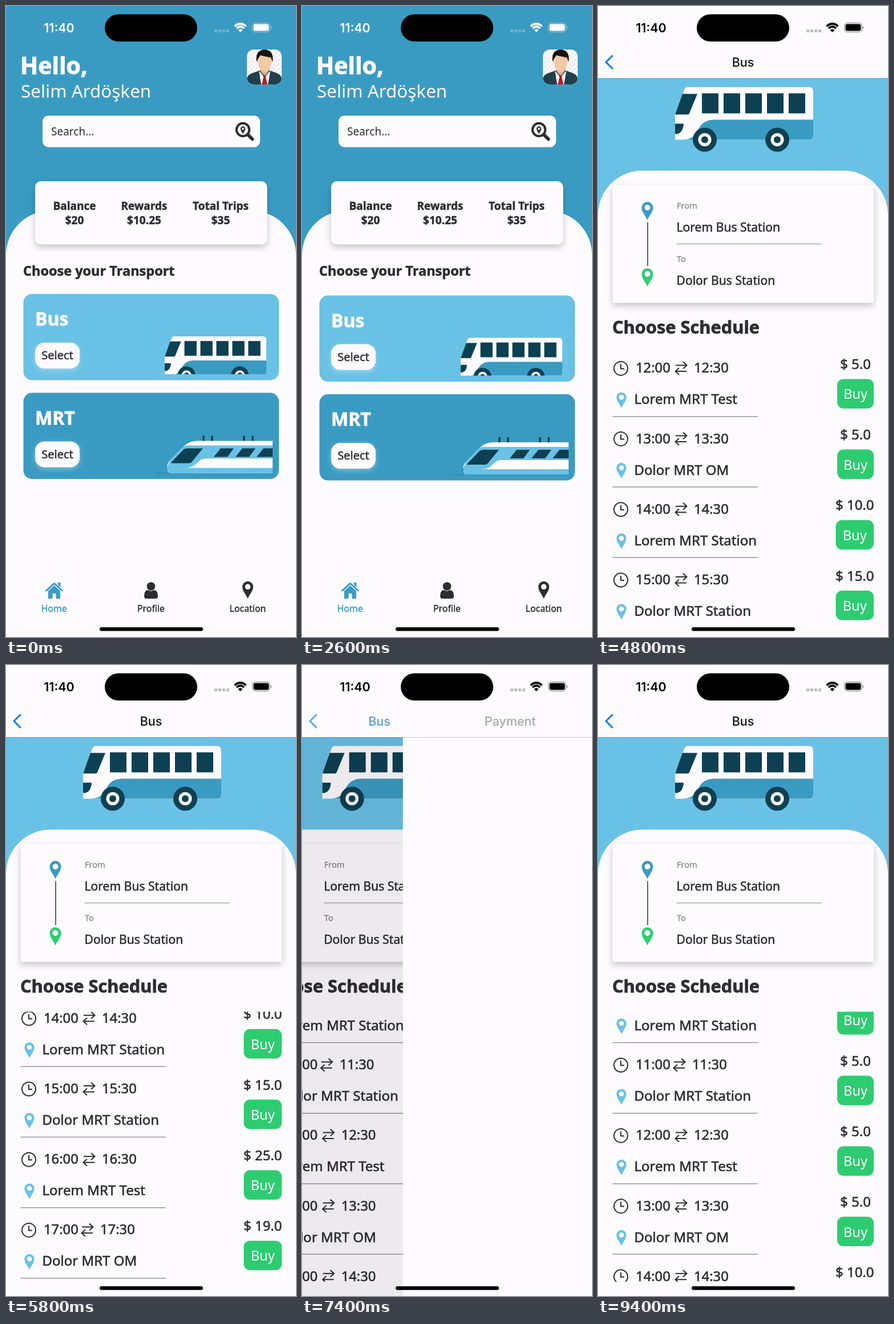
An HTML page that plays this animation: 508x1102 px, repeating every 9500 ms.

```html
<!DOCTYPE html>
<html lang="en">
<head>
<meta charset="utf-8">
<title>Transport app</title>
<style>
  html, body { margin: 0; width: 100%; height: 100%; overflow: hidden; background: #fefbff; }
  svg { display: block; width: 100%; height: 100%; }
  text { font-family: "Noto Sans", "Open Sans", sans-serif; white-space: pre; }
  .ui { font-family: Inter, Roboto, sans-serif; }
  .raised { filter: drop-shadow(0 5px 6px rgba(0, 0, 0, .22)); }
  .glow { filter: drop-shadow(0 3px 5px rgba(255, 255, 255, .35)); }
</style>
</head>
<body>
<svg id="stage" viewBox="0 0 508 1102" xmlns="http://www.w3.org/2000/svg"></svg>
<script>
const LOOP = 9500, STEP = 100, WIDTH = 508;
const WHITE = '#fefbff', INK = '#2e2c31', BLUE = '#3a9bc2', SKY = '#69c1e6',
      NAVY = '#0d4052', GREEN = '#2ecc71', GREY = '#8d8b90', LINK = [8, 123, 232];

// Markup helpers
const rawText = (x, y, str, size, weight, fill, anchor, extra = '') =>
  `<text x="${x}" y="${y}" font-size="${size}" font-weight="${weight}" fill="${fill}" text-anchor="${anchor}" ${extra}>${str}</text>`;
// A fine outline gives the medium and heavy weights their body
const text = (x, y, str, size, weight = 500, fill = INK, anchor = 'start') =>
  rawText(x, y, str, size, weight, fill, anchor,
    weight > 400 ? `stroke="${fill}" stroke-width="${size * .025}"` : '');
const uiText = (x, y, str, weight, fill, extra = '') =>
  rawText(x, y, str, 21.5, weight, fill, 'middle', 'class="ui" ' + extra);
const mid = (x, y, str, size, weight, fill) => text(x, y, str, size, weight, fill, 'middle');
const rect = (x, y, w, h, r, fill, extra = '') =>
  `<rect x="${x}" y="${y}" width="${w}" height="${h}" rx="${r}" fill="${fill}" ${extra}/>`;
const circle = (x, y, r, fill) => `<circle cx="${x}" cy="${y}" r="${r}" fill="${fill}"/>`;
const path = (d, fill, extra = '') => `<path d="${d}" fill="${fill}" ${extra}/>`;
const stroke = (d, color, width, extra = '') =>
  path(d, 'none', `stroke="${color}" stroke-width="${width}" ${extra}`);
const group = (attrs, ...parts) => `<g ${attrs}>${parts.join('')}</g>`;
const at = (x, y, s = 1) => `transform="translate(${x} ${y}) scale(${s})"`;

const pin = (x, y, scale, fill) => group(at(x, y, scale),
  path('M0 16C-3 8-10 2-10-6A10 10 0 0 1 10-6C10 2 3 8 0 16ZM0-11A5 5 0 1 0 0-1 5 5 0 1 0 0-11Z', fill, 'fill-rule="evenodd"'));

// White sheet with round shoulders
const SHOULDER = 77.5;
const sheet = top => path(
  `M0 1102V${top + SHOULDER}a${SHOULDER} ${SHOULDER} 0 0 1 ${SHOULDER} ${-SHOULDER}` +
  `H${WIDTH - SHOULDER}a${SHOULDER} ${SHOULDER} 0 0 1 ${SHOULDER} ${SHOULDER}V1102Z`, WHITE);

const wheel = x => circle(x, 92, 21, NAVY) + circle(x, 92, 11.5, WHITE) + circle(x, 92, 6, NAVY);
const busArt = [
  path('M22 0H234Q242 0 242 8V84Q242 92 234 92H0V47L16 5Q18 0 22 0Z', WHITE),
  path('M242 57H70Q51 57 43 70L36 82Q29 92 12 92H234Q242 92 242 84Z', BLUE),
  path('M13 12H39L25 46Q24 48 22 48H0Z', NAVY),
  path('M0 64H15Q14 79 4 82H0Z', NAVY),
  ...[0, 1, 2, 3, 4].map(i => rect(47 + 38 * i, 11, 29, 35, 0, NAVY)),
  wheel(52), wheel(179)
].join('');

const trainArt = [
  stroke('M265 140.5H284', NAVY, 1, 'opacity=".35"'),
  stroke('M346 75V85M361 75V85M417 75V85M432 75V85', NAVY, 3.5),
  path('M283 131Q281 125 287 118L312 93Q321 84 336 84H467V140H290Q282 140 283 131Z', WHITE),
  path('M283 129L287 118L311 94Q314 92 320 92H467V115H350Q341 115 335 122Q328 131 315 131H467V140H290Q282 140 283 129Z', SKY),
  path('M350 115Q341 115 335 122Q328 131 315 131H467V115Z', WHITE),
  path('M289 122L311 99Q314 97 318 97H345L326 120Q324 123 320 123H290Z', NAVY),
  ...[364, 402, 439].map(x =>
    path(`M${x} 112L${x + 12} 97H${Math.min(x + 35, 467)}L${x === 439 ? 467 : x + 24} 112Z`, NAVY))
].join('');

const statusBar = group('id="status"',
  uiText(93, 46, '11:40', 600, 'currentColor'),
  ...[0, 1, 2, 3].map(i => rect(365 + 7 * i, 41, 5, 5, 1, 'currentColor', 'opacity=".25"')),
  stroke('M400.5 35.5Q410.5 26.5 420.5 35.5M404 39Q410.5 33 417 39', 'currentColor', 3.6),
  path('M406.5 42Q410.5 38.5 414.5 42L410.5 46Z', 'currentColor'),
  rect(431.5, 29.5, 31, 16, 5, 'none', 'stroke="currentColor" stroke-opacity=".5"'),
  rect(433.5, 31.5, 27, 12, 3.2, 'currentColor'),
  path('M464 35Q467 37.5 464 40Z', 'currentColor', 'opacity=".5"'));

const avatar = group('clip-path="url(#avatarClip)"',
  rect(422, 76, 61, 61, 0, 'url(#checks)'),
  path('M422 137V127Q423 120 432 117L446 112H460L474 117Q482 120 483 127V137Z', '#223f4b'),
  path('M443 113L453 124L463 113L459 137H447Z', '#fff'),
  path('M446 106H460V114L453 122L446 114Z', '#e5b48c'),
  path('M450 121H456L455 125L458 137H448L451 125Z', '#c4161c'),
  path('M441 86Q453 80 465 86V98Q463 113 453 115Q443 113 441 98Z', '#f2c9a3'),
  path('M439 98Q436 77 453 76Q470 77 467 98L464 90Q452 88 446 86Q442 90 439 98Z', '#17130f'));

const stat = (x, label, value) => mid(x, 356, label, 19, 600) + mid(x, 380.5, value, 19, 600);

const transportCard = (y, name, fill, art) => group(at(0, y),
  rect(30.5, 0, 447.5, 150.5, 15, fill),
  text(51, 55, name, 32, 700, WHITE),
  rect(51, 85, 78, 45, 16, WHITE, 'class="glow"'),
  mid(90, 114, 'Select', 20),
  art);

const tab = (x, label, fill, icon) => icon + mid(x, 1058, label, 15.9, 500, fill);

const home = group('id="home"',
  rect(0, 0, 508, 1102, 0, BLUE), sheet(357.5),
  text(25, 119, 'Hello,', 41, 700, WHITE),
  text(26, 160, 'Selim Ardöşken', 31.4, 400, WHITE),
  avatar,
  rect(64, 191.5, 381, 55, 10, WHITE),
  text(79, 226, 'Search...', 19, 400),
  `<circle cx="415" cy="216" r="11.2" fill="none" stroke="${INK}" stroke-width="4"/>`,
  stroke('M424 225L431.5 232.5', INK, 6, 'stroke-linecap="round"'),
  pin(415, 217, .42, INK),
  rect(51, 306, 406.5, 110.5, 10, WHITE, 'class="raised"'),
  stat(120, 'Balance', '$20'), stat(242, 'Rewards', '$10.25'), stat(376, 'Total Trips', '$35'),
  text(30, 471, 'Choose your Transport', 23.5, 600),
  group('id="cards"',
    transportCard(503, 'Bus', SKY,
      group('clip-path="url(#cardClip)"', group(at(278, 74, .7355), busArt))),
    transportCard(675.5, 'MRT', BLUE, trainArt)),
  tab(84, 'Home', BLUE,
    stroke('M70.5 1021L84.5 1008.5L98.5 1021', BLUE, 3, 'stroke-linecap="round"') +
    path('M74 1021.5L84.5 1012L95 1021.5V1035H87.5V1026H81.5V1035H74ZM91 1007H95.5V1015L91 1011Z', BLUE)),
  tab(254, 'Profile', INK,
    circle(254, 1013.5, 7.3, INK) +
    path('M242 1031Q242 1020 249 1020Q254 1023.5 259 1020Q266 1020 266 1031Q266 1035 262 1035H246Q242 1035 242 1031Z', INK)),
  tab(423.5, 'Location', INK, pin(423.5, 1020, .95, INK)),
  rect(0, 0, 508, 1102, 0, '#000', 'id="homeDim"'));

// Schedule list
const STATIONS = ['Lorem MRT Station', 'Dolor MRT Station', 'Lorem MRT Test', 'Dolor MRT OM'];
const PRICES = ['5.0', '5.0', '5.0', '5.0', '10.0', '15.0', '25.0', '19.0'];
const ROW = 123.2;

const scheduleRow = (price, i) => {
  const hour = 10 + i, shift = hour === 11 || hour === 17 ? -3 : 0;
  const buttonWidth = price.length > 3 ? 66.5 : 64, center = 483 - buttonWidth / 2;
  return group(at(0, ROW * i),
    `<circle cx="40" cy="644.5" r="12" fill="none" stroke="${INK}" stroke-width="2"/>`,
    stroke('M40 637V645H46', INK, 2),
    text(66, 652, hour + ':00', 23.8),
    stroke('M136 639H155M149 633L155.5 639L149 645M155 649.5H136M142 643.5L135.5 649.5L142 655.5', INK, 2, at(shift, 0)),
    text(168 + shift, 652, hour + ':30', 23.8),
    pin(41, 700, .86, SKY),
    text(63.5, 707, STATIONS[i % 4], 24),
    stroke('M25.5 728.5H280', '#98969b', 1.5),
    mid(center, 645.5, '$ ' + price, 23.9),
    rect(483 - buttonWidth, 663, buttonWidth, 51.5, 11, GREEN),
    mid(center, 698, 'Buy', 23.6, 400, WHITE));
};

const busScreen = group('id="bus"',
  rect(0, 0, 508, 1102, 0, WHITE),
  group('id="busBody"',
    rect(0, 126, 508, 300, 0, SKY), sheet(287.5),
    group('id="busArt" ' + at(135, 141.5), busArt),
    rect(25.5, 313, 457.5, 205.5, 1, WHITE, 'class="raised"'),
    pin(86.5, 358, 1, BLUE), stroke('M87 377.5V454', INK, 1.5), pin(86.5, 474, 1, GREEN),
    text(138, 354, 'From', 14.6, 500, GREY), text(137.5, 394, 'Lorem Bus Station', 21.1),
    stroke('M137.5 415.5H392', '#aaa8ad', 1.5),
    text(138, 447, 'To', 14.6, 500, GREY), text(137.5, 487, 'Dolor Bus Station', 21.1),
    text(25, 572, 'Choose Schedule', 30.8, 700),
    group('clip-path="url(#listClip)"', group('id="list"', ...PRICES.map(scheduleRow))),
    rect(0, 126, 508, 976, 0, '#000', 'id="busDim"')),
  rect(0, 126, 508, 976, 0, WHITE, 'id="payment"'),
  rect(0, 0, 508, 126, 0, WHITE),
  stroke('M0 126.5H508', '#000', 1, 'opacity=".18"'),
  stroke('M25 87L14 98L25 109', `rgb(${LINK})`, 3, 'id="chevron" stroke-linecap="round" stroke-linejoin="round"'),
  uiText(0, 106, 'Bus', 500, '#111', 'id="busTitle"'),
  uiText(0, 106, 'Payment', 500, '#111', 'id="payTitle"'));

document.getElementById('stage').innerHTML = `<defs>
  <clipPath id="avatarClip">${rect(422, 76, 61, 61, 12, '#000')}</clipPath>
  <clipPath id="cardClip">${rect(270, 60, 200, 80, 0, '#000')}</clipPath>
  <clipPath id="listClip">${rect(0, 605.5, 508, 471.5, 0, '#000')}</clipPath>
  <pattern id="checks" width="8" height="8" patternUnits="userSpaceOnUse">
    ${rect(0, 0, 8, 8, 0, '#fff') + rect(0, 0, 4, 4, 0, '#ececef') + rect(4, 4, 4, 4, 0, '#ececef')}
  </pattern></defs>` +
  home + busScreen + statusBar +
  rect(173, 14.5, 162, 47.5, 23.75, '#000') + rect(164, 1085, 181, 6.5, 3.25, '#000');

// Motion
const BOUNCE = [[1900, 0], [2200, 28], [2400, 13], [2600, 2.6], [2800, 0]];
const SCROLL = [[4200, 0], [4500, 70], [4800, 258], [5100, 430], [5400, 510],
                [5800, 520], [6100, 330], [6400, 110], [6600, 69]];

const clamp = v => Math.max(0, Math.min(1, v));

// Smooth curve through [time, value] points, at rest at both ends
function follow(keys, t) {
  const last = keys.length - 1;
  if (t <= keys[0][0]) return keys[0][1];
  if (t >= keys[last][0]) return keys[last][1];
  const i = keys.findIndex(k => k[0] > t) - 1;
  const slope = n => n <= 0 || n >= last ? 0
    : (keys[n + 1][1] - keys[n - 1][1]) / (keys[n + 1][0] - keys[n - 1][0]);
  const [t0, a] = keys[i], [t1, b] = keys[i + 1], d = t1 - t0, u = (t - t0) / d;
  const ease = u * u * (3 - 2 * u);
  return a + (b - a) * ease + d * u * (1 - u) * (slope(i) * (1 - u) - slope(i + 1) * u);
}

// Critically damped spring from 0 to 1
function spring(t, start) {
  const x = Math.max(0, t - start) * .0174;
  return 1 - (1 + x) * Math.exp(-x);
}

const $ = id => document.getElementById(id);
const set = (id, attrs) => Object.entries(attrs).forEach(([k, v]) => $(id).setAttribute(k, v));
const move = (id, x, y = 0) => set(id, { transform: `translate(${x} ${y})` });

function render(t) {
  const push = spring(t, 3380);
  const pay = spring(t, 7272) * (1 - spring(t, 8650));

  move('home', -.3 * WIDTH * push);
  move('cards', 0, follow(BOUNCE, t));
  set('homeDim', { opacity: .1 * push });
  move('bus', WIDTH * (1 - push));
  const shade = Math.round(255 * (1 - push));
  $('status').style.color = `rgb(${shade},${shade},${shade})`;

  move('list', 0, -follow(SCROLL, t));
  set('busArt', { opacity: clamp((t - 3600) / 570) });
  move('busBody', -.3 * WIDTH * pay);
  set('busDim', { opacity: .1 * pay });
  move('payment', WIDTH * (1 - pay));

  const pressed = t >= 8500 && t < 8700 ? .3 : 1;
  const fade = pressed * (1 - 1.5 * pay * (1 - pay));
  const tint = LINK.map(c => Math.round(17 + (c - 17) * clamp(pay * 1.3)));
  set('chevron', { opacity: fade });
  set('busTitle', { x: 254 - 198 * Math.pow(pay, 1.2), fill: `rgb(${tint})`, opacity: fade });
  set('payTitle', { x: 254 + 318 * (1 - pay), opacity: Math.pow(pay, 2.4) });
}

const began = performance.now();
function tick() {
  const t = (performance.now() - began) % LOOP;
  render(Math.floor(t / STEP) * STEP);
  requestAnimationFrame(tick);
}
tick();
</script>
</body>
</html>
```
